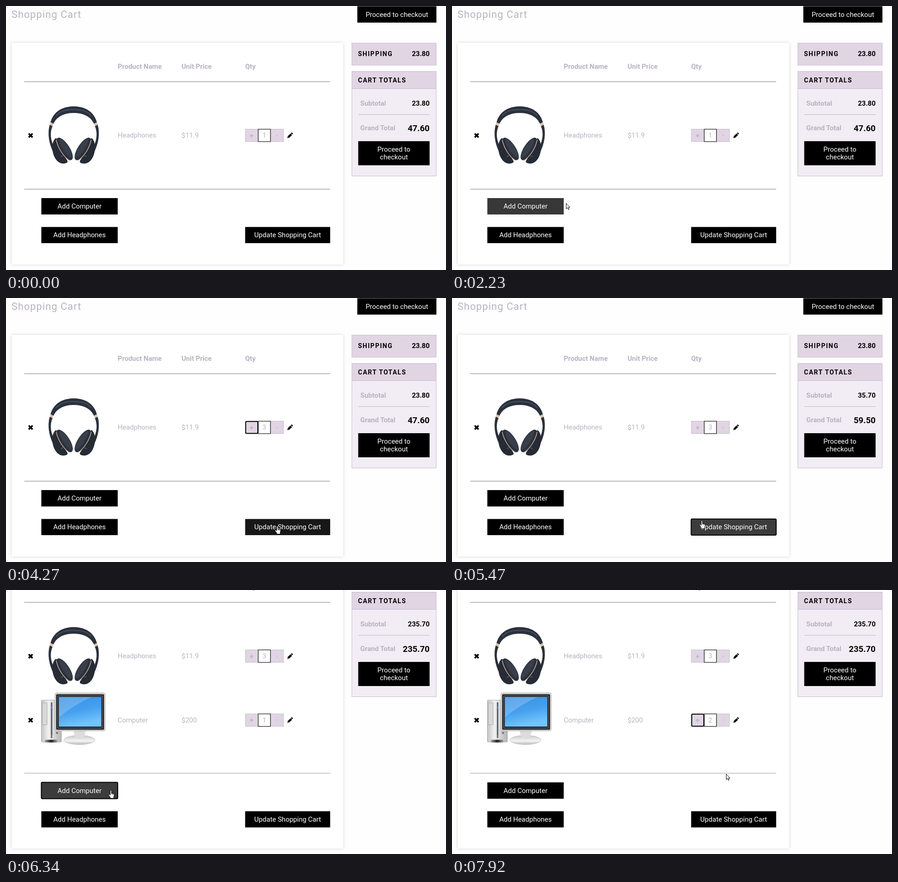
These frames come from a looping animation (965 by 580 pixels, 8000 ms). An HTML page:

```html
<!DOCTYPE html>
<html lang="en">
<head>
<meta charset="utf-8">
<title>Shopping Cart</title>
<style>
  html, body { margin: 0; width: 100%; height: 100%; overflow: hidden; background: #fefefe; }
  svg { display: block; width: 965px; height: 580px; font: 15px Roboto, sans-serif; }
  .mute { fill: #b9b2c0; }
  .bold { font-weight: 700; }
  .caps { font-size: 14px; font-weight: 700; letter-spacing: 1.5px; }
  .big { font-size: 18.6px; font-weight: 700; }
  .mid { text-anchor: middle; }
  .end { text-anchor: end; }
  .white { fill: #fff; }
  .lilac { fill: #e1d5e4; stroke: #c6bacb; }
  .focus { fill: none; stroke: #000; stroke-width: 2; }
  #card { filter: drop-shadow(0 0 3px rgba(0, 0, 0, .17)); }
</style>
</head>
<body>
<svg id="stage" viewBox="0 0 965 580" xmlns="http://www.w3.org/2000/svg"></svg>
<script>
const LOOP = 8000, ADDED = 6340, SCROLL = 139;
const stage = document.getElementById('stage');
const $ = id => document.getElementById(id);

const text = (x, y, s, cls = '', id = '') =>
  `<text x="${x}" y="${y}" class="${cls}" id="${id}">${s}</text>`;
const rect = (x, y, w, h, attrs = '') =>
  `<rect x="${x}" y="${y}" width="${w}" height="${h}" ${attrs}/>`;
const rule = (x1, x2, y, w, id = '') =>
  `<path d="M${x1} ${y}H${x2}" stroke="#b9b3c0" stroke-width="${w}" id="${id}"/>`;
const button = (id, x, y, w, h, label) =>
  rect(x, y, w, h, `id="${id}"`) +
  rect(x, y, w, h, `rx="2" class="focus" id="${id}Focus"`) +
  text(x + w / 2, y + h / 2 + 5, label, 'mid white');

const ear = `
  <path d="M97.5 255 104 258.5 102 264.5 95.8 261.5Z" fill="#dcc0a8"/>
  <path d="M95.8 261 102 264C96 278 97.5 294 105 308L112 332 104 322C94 302 90.5 280 95.8 261Z" fill="#2a303b"/>
  <path d="M110 290C101 294 99 316 106 331C111 342 119 347 128 346C136 345 137 342 132 336Z" fill="#262b35"/>
  <ellipse cx="128.5" cy="314" rx="11" ry="28.5" transform="rotate(-33 128.5 314)" fill="#2b313c"/>
  <ellipse cx="131" cy="312.5" rx="6.5" ry="24" transform="rotate(-33 131 312.5)" fill="#383f4b"/>
  <path d="M110 294C114 312 125 330 139 339.5" fill="none" stroke="#cbad96" stroke-width="1.5"/>
  <path d="M120 331l5-2" stroke="#737a86"/>`;

const headphones = `
  <path d="M97.5 256C104 231 125 220.5 148.5 220.5S193 231 199.5 256L193 259C186 243 170 235 148.5 235S111 243 104 259Z" fill="#2b313d"/>
  <path d="M110 241C120 230 132 227.5 148.5 227.5S177 230 187 241" fill="none" stroke="#465064" stroke-width="2"/>
  ${ear}<g transform="matrix(-1 0 0 1 297 0)">${ear}</g>`;

const computer = `
  ${rect(77.5, 242, 44, 92, 'rx="2" fill="url(#metal)" stroke="#a9a9a9"')}
  ${rect(80, 248, 10, 48, 'fill="#d9d9d9" stroke="#999" stroke-width=".8"')}
  ${rect(98.5, 247, 3, 78, 'fill="#55585c"')}
  <circle cx="100" cy="258" r="2" fill="#3d9bf0"/>
  <circle cx="100" cy="321" r="1.6" fill="#b58a62"/>
  <circle cx="112" cy="314" r="3" fill="#777" stroke="#ccc"/>
  ${rect(85, 329, 28, 6, 'rx="2" fill="url(#foot)"')}
  <ellipse cx="161" cy="329.5" rx="34" ry="10" fill="url(#base)" stroke="#bcbcbc"/>
  <path d="M148 309H175L171 325Q161 329 152 325Z" fill="#dcdcdc"/>
  ${rect(107.5, 226, 110, 83.5, 'rx="4" fill="#d4d6d8" stroke="#aaa"')}
  ${rect(110, 229, 105, 78, 'rx="2" fill="#24282d"')}
  ${rect(113.5, 232.5, 98, 71, 'fill="none" stroke="#777c82"')}
  ${rect(116, 235, 93, 65, 'fill="url(#screen)"')}
  <path d="M116 235H188Q146 254 116 280Z" fill="#fff" opacity=".2"/>`;

const row = (n, name, price, picture) => `
  <path d="M49.8 280.2 58.2 288.6M58.2 280.2 49.8 288.6" stroke="#000" stroke-width="3.7"/>
  ${picture}
  ${text(245, 289, name, 'mute')}${text(385, 289, price, 'mute')}
  ${rect(525, 270.5, 28, 27.5, 'class="lilac"')}${rect(580.5, 270.5, 28, 27.5, 'class="lilac"')}
  ${rect(553.2, 270.6, 26.8, 27.4, 'fill="#fff" stroke="#111" stroke-width="1.2"')}
  ${rect(525.7, 271.2, 26.6, 26.4, `rx="2.5" class="focus" id="plus${n}Focus"`)}
  ${text(538.5, 289.5, '+', 'mute bold mid')}${text(594.5, 288.5, '-', 'mute mid')}
  ${text(566.5, 289, 1, 'mute mid', 'qty' + n)}
  <path d="M617 290.2 617.8 286.3 624 280.1 627.3 283.4 621 289.4ZM624.8 279.3 626 278.2Q626.9 277.6 627.7 278.4L628.7 279.4Q629.5 280.3 628.8 281.2L628 282.5Z"/>
  <path d="M618.3 287.6 619.7 289" stroke="#fff" stroke-width=".9"/>`;

stage.innerHTML = `
<defs>
  <linearGradient id="metal"><stop stop-color="#c4c4c4"/><stop offset=".35" stop-color="#f1f1f1"/><stop offset="1" stop-color="#b4b4b4"/></linearGradient>
  <linearGradient id="foot"><stop stop-color="#aaa"/><stop offset=".5" stop-color="#222"/><stop offset="1" stop-color="#aaa"/></linearGradient>
  <linearGradient id="base" x2="0" y2="1"><stop stop-color="#c9c9c9"/><stop offset=".6" stop-color="#f4f4f4"/><stop offset="1" stop-color="#bbb"/></linearGradient>
  <linearGradient id="screen" x2=".3" y2="1"><stop stop-color="#3a90e0"/><stop offset=".55" stop-color="#46a0ee"/><stop offset="1" stop-color="#72c4fc"/></linearGradient>
</defs>
${rect(12.5, 81, 727, 487, 'fill="#fff" id="card"')}
<g id="page">
  <text x="12" y="26" class="mute" style="font-size:22px;letter-spacing:1.1px">Shopping Cart</text>
  ${button('top', 770.5, .5, 173.5, 36, 'Proceed to checkout')}
  ${text(245, 138, 'Product Name', 'mute bold')}
  ${text(385, 138, 'Unit Price', 'mute bold')}
  ${text(524.5, 138, 'Qty', 'mute bold')}
  ${rule(40, 711, 166.3, 2)}
  ${row(1, 'Headphones', '$11.9', headphones)}
  <g id="extra" transform="translate(0 140.6)">
    ${row(2, 'Computer', '$200', `<g transform="translate(0 -1.6)">${computer.trim() && `<g transform="translate(0 0)">${computer}</g>`}</g>`.replace('translate(0 -1.6)', 'translate(0 -1.6)'))}
  </g>
  ${rect(758.5, 81.5, 185, 48.5, 'class="lilac"')}
  ${text(772, 110, 'SHIPPING', 'caps')}${text(929, 110, '23.80', 'bold end')}
  ${rect(758.5, 144, 185, 229.5, 'fill="#f2edf4" stroke="#c6bacb"')}
  ${rect(758.5, 144, 185, 37.5, 'class="lilac"')}
  ${text(772, 167.5, 'CART TOTALS', 'caps')}
  ${text(777, 219, 'Subtotal', 'mute bold')}${text(929, 219, '', 'bold end', 'sub')}
  ${rule(773, 929, 238.5, 1)}
  ${text(777, 272.5, 'Grand Total', 'mute bold')}${text(929, 274.5, '', 'big end', 'grand')}
  ${rect(772.5, 297, 156.5, 53)}
  ${text(850.7, 319.5, 'Proceed to', 'mid white')}${text(850.7, 336.5, 'checkout', 'mid white')}
</g>
${rule(40, 711, 402.5, 2, 'floor')}
<g id="low">
  ${button('computer', 77.5, 422, 167.5, 36, 'Add Computer')}
  ${button('headphones', 77.5, 485.5, 167.5, 35.5, 'Add Headphones')}
  ${button('update', 524.5, 485.5, 186.5, 35.5, 'Update Shopping Cart')}
</g>
<g id="cursor" fill="#fff" stroke="#000" stroke-linejoin="round">
  <path id="arrow" d="M.5 .5V12.6L3.2 10 5 14.2 6.9 13.4 5.1 9.3H8.8Z"/>
  <g id="hand">
    <path d="M-1.4 10.5V1.4C-1.4-.4 1.3-.4 1.3 1.4V6.2L5.9 7.3Q7.7 7.9 7.5 10L6.3 14.5V17.7H-1.2V15.6L-4.9 10.4C-5.4 8.5-3.6 8.1-2.8 9.1Z"/>
    <path d="M1.3 6.2V9.5M3.5 7V9.7M5.6 7.6V9.9" stroke-width=".8"/>
  </g>
</g>`;

// Pointer route: time, x, y of the tip
const route = [
  [160, 803, 566], [300, 690, 528], [420, 610, 490], [510, 600, 425], [620, 628, 378],
  [1030, 626, 380], [1300, 530, 410], [1670, 355, 377], [1820, 270, 402],
  [2060, 205, 436], [2200, 225, 438], [2420, 400, 405], [2640, 571, 345],
  [2690, 568, 341], [2920, 533, 296], [3150, 530, 287], [3420, 530, 287], [3430, 527, 285],
  [3580, 527, 285], [3930, 560, 390], [4270, 595, 501], [4620, 595, 501], [4630, 589, 494],
  [5420, 588, 494], [5620, 430, 474], [5830, 241, 441], [6160, 230, 440],
  [6490, 230, 440], [6750, 440, 400], [6900, 575, 350], [7040, 540, 320], [7180, 534, 288],
  [7420, 534, 288], [7640, 560, 345], [7920, 601, 404]
];

function pointer(t) {
  if (t < route[0][0]) return null;
  const i = route.findIndex(p => p[0] > t);
  if (i < 0) return route.at(-1).slice(1);
  const [a, b] = [route[i - 1], route[i]];
  const k = (t - a[0]) / (b[0] - a[0]);
  return [a[1] + (b[1] - a[1]) * k, a[2] + (b[2] - a[2]) * k];
}

const areas = {
  computer: [77, 422, 245, 458],
  update: [524, 485, 711, 521],
  qty: [525, 270, 609, 300]
};
const over = (p, name) => {
  const [l, t, r, b] = areas[name];
  return p && p[0] >= l && p[0] <= r && p[1] >= t && p[1] <= b;
};

// Linear hover fade: share of the last 160 ms spent inside
function hoverColor(t, name) {
  let n = 0;
  for (let k = 0; k < 16; k++) if (over(pointer(t - k * 10), name)) n++;
  const c = Math.round(n / 16 * 60);
  return `rgb(${c},${c},${c})`;
}

const show = (id, on) => $(id).setAttribute('display', on ? 'inline' : 'none');
const put = (id, s) => { if ($(id).textContent !== s) $(id).textContent = s; };
const move = (id, x, y) => $(id).setAttribute('transform', `translate(${x} ${y})`);

const focusTimes = {
  plus1: [3100, 4630], update: [4630, 6260], computer: [6260, 7360], plus2: [7360, LOOP],
  top: [0, 0], headphones: [0, 0]
};

function draw(t) {
  const added = t >= ADDED, updated = t >= 4780;
  move('page', 0, added ? -SCROLL : 0);
  move('low', 0, added ? .6 : 0);
  $('card').setAttribute('y', added ? 81 - SCROLL : 81);
  $('card').setAttribute('height', added ? 487 + SCROLL : 487);
  $('floor').setAttribute('stroke-width', added ? 1.5 : 2);
  show('extra', added);

  put('qty1', t < 3100 ? '1' : t < 3580 ? '2' : '3');
  put('qty2', t < 7360 ? '1' : '2');
  put('sub', added ? '235.70' : updated ? '35.70' : '23.80');
  put('grand', added ? '235.70' : updated ? '59.50' : '47.60');

  for (const [id, [from, to]] of Object.entries(focusTimes)) show(id + 'Focus', t >= from && t < to);
  for (const id of ['computer', 'update']) $(id).setAttribute('fill', hoverColor(t, id));

  const p = pointer(t);
  show('cursor', p);
  if (!p) return;
  const hand = Object.keys(areas).some(name => over(p, name));
  show('hand', hand);
  show('arrow', !hand);
  move('cursor', Math.round(p[0]), Math.round(p[1]));
}

const start = performance.now();
function tick() {
  draw((performance.now() - start) % LOOP);
  requestAnimationFrame(tick);
}
tick();
</script>
</body>
</html>
```
